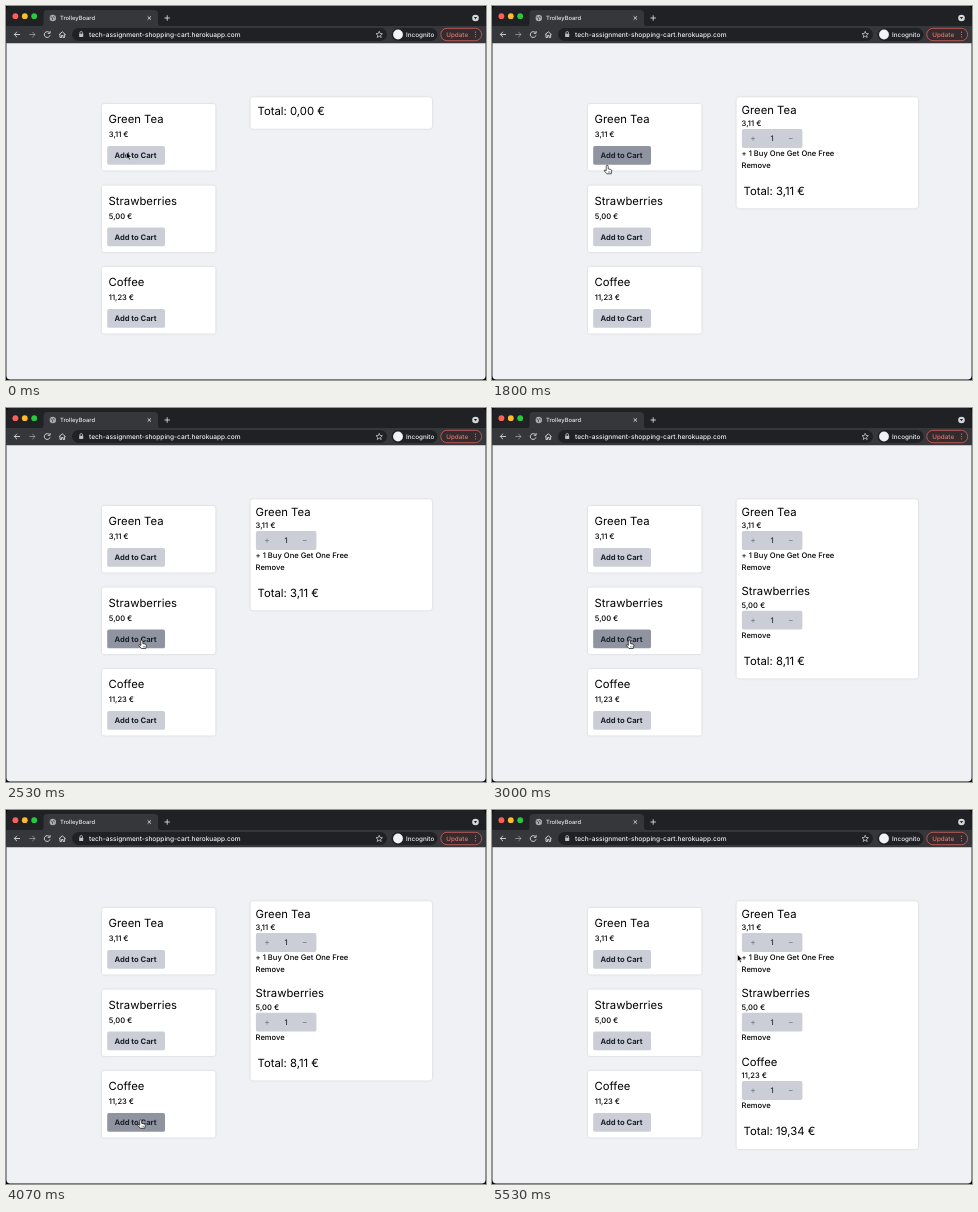
Animation, 480 px wide and 374 px high, one loop 8 s. Source, as an HTML page:

```html
<!DOCTYPE html>
<html lang="en">
<head>
<meta charset="utf-8">
<title>Cart demo</title>
<style>
  html, body { margin: 0; width: 100%; height: 100%; overflow: hidden; background: #0b0b0d; }
  svg { display: block; width: 480px; height: 374px; }
  text { font-family: Inter, "Liberation Sans", sans-serif; font-weight: 500; text-rendering: geometricPrecision; white-space: pre; }
  .title { font-size: 11.3px; font-weight: 400; fill: #000; }
  .body { font-size: 7.6px; fill: #000; }
  .label { font-size: 7.6px; font-weight: 700; fill: #1a202c; }
  .sign { font-size: 8.4px; font-weight: 400; fill: #6b7280; text-anchor: middle; }
  .count { font-size: 7.6px; fill: #1f2937; text-anchor: middle; }
  .card { fill: #fff; filter: drop-shadow(0 .9px .9px rgba(0, 0, 0, .14)); }
  .line { fill: none; stroke: #d9dbdf; stroke-width: .9; }
  .thin { stroke-width: .7; }
</style>
</head>
<body>
<svg viewBox="0 0 480 374">
  <!-- window -->
  <path d="M0 20V5Q0 0 5 0H475Q480 0 480 5V20Z" fill="#202124"/>
  <rect y="20" width="480" height="18" fill="#36373b"/>
  <path d="M.4 37.2H479.6V369.6Q479.6 373.6 475.6 373.6H4.4Q.4 373.6 .4 369.6Z" fill="#f0f1f5"/>
  <circle cx="9.4" cy="10.2" r="2.9" fill="#ff5f57"/>
  <circle cx="18.8" cy="10.2" r="2.9" fill="#febc2e"/>
  <circle cx="28.2" cy="10.2" r="2.9" fill="#28c840"/>

  <!-- tab -->
  <path d="M34 20.5Q37.5 20.5 37.5 17V8Q37.5 4 41.5 4H148Q152 4 152 8V17Q152 20.5 155.5 20.5Z" fill="#36373b"/>
  <circle cx="46.8" cy="12" r="3.2" fill="#a9acb1"/>
  <path d="M44.4 10.8l2 .9.3 2.4M48.6 9.6l-1.3 1.3 1.4 1" fill="none" stroke="#45474b" stroke-width=".8"/>
  <text x="54" y="14.1" font-size="5.8" fill="#e8eaed">TrolleyBoard</text>
  <path class="line" d="M141.6 10.3l3.4 3.4m0-3.4l-3.4 3.4M158.5 12h5.4m-2.7-2.7v5.4"/>
  <circle cx="469.5" cy="12" r="3.3" fill="#d5d7da"/>
  <path d="M467.9 11.1h3.2l-1.6 2.2Z" fill="#202124"/>

  <!-- toolbar -->
  <rect x="66" y="22" width="315" height="13" rx="6.5" fill="#202124"/>
  <g class="line">
    <path d="M14 28.5H8.3m2.7-2.7l-2.7 2.7 2.7 2.7"/>
    <path d="M23.3 28.5H29m-2.7-2.7l2.7 2.7-2.7 2.7" opacity=".55"/>
    <path d="M43.5 26.8A2.9 2.9 0 1 0 44 29.3M44.1 25.1v2.2h-2.3"/>
    <path d="M53 28.7l3.3-2.9 3.3 2.9M54 28.2v3.3h1.5v-2h1.6v2h1.5v-3.3"/>
    <path class="thin" d="M73.9 28v-1.2a1.3 1.3 0 0 1 2.6 0V28"/>
    <path class="thin" d="M373.2 25.3l.9 2.2 2.3.2-1.8 1.5.6 2.3-2-1.3-2 1.3.6-2.3-1.8-1.5 2.3-.2Z"/>
  </g>
  <rect x="73.2" y="27.8" width="4" height="3.2" rx=".5" fill="#bdc1c6"/>
  <text x="83" y="30.9" font-size="6.55" fill="#f1f2f4">tech-assignment-shopping-cart.herokuapp.com</text>
  <rect x="385.5" y="22" width="46" height="13" rx="6.5" fill="#202124"/>
  <circle cx="392" cy="28.5" r="4.9" fill="#f1f3f4"/>
  <text x="400.1" y="30.8" font-size="6.3" fill="#f1f3f4">Incognito</text>
  <rect x="434.8" y="22.3" width="40.8" height="12.4" rx="6.2" fill="#342b2e" stroke="#d9635f" stroke-width=".8"/>
  <text x="440.3" y="30.8" font-size="6.3" fill="#f0706a">Update</text>
  <g fill="#f0706a">
    <circle cx="469.5" cy="26.2" r=".6"/><circle cx="469.5" cy="28.5" r=".6"/><circle cx="469.5" cy="30.8" r=".6"/>
  </g>

  <g id="shop"></g>
  <g id="cart"></g>
  <g id="arrow">
    <path d="M0 0V7l1.6-1.5 1 2.4 1.2-.5-1-2.3H5Z" fill="#000" stroke="#fff" stroke-width=".5"/>
  </g>
  <g id="hand">
    <path d="M-1 1a1 1 0 0 1 2 0V3.6l2.6.6q1 .3 1 1.3l-.6 3H-.3L-2.9 5.6q-.3-1 .7-1L-1 5.5Z"
      fill="#fff" stroke="#000" stroke-width=".65" stroke-linejoin="round"/>
    <path d="M1.5 6v1.5M2.8 6v1.5" stroke="#000" stroke-width=".4"/>
  </g>
</svg>
<script>
const $ = id => document.getElementById(id);
const TICK = 1000 / 15, LOOP = 120;

const products = [
  { name: "Green Tea", price: "3,11 €", offer: "+ 1 Buy One Get One Free" },
  { name: "Strawberries", price: "5,00 €" },
  { name: "Coffee", price: "11,23 €" }
];
const totals = ["0,00 €", "3,11 €", "8,11 €", "19,34 €"];

// Times below are in ticks of 1/15 s.
const addAt = [26, 39, 65];
const hover = [[9, 27], [32, 54], [57, 75]];
const FADE = 2.25;
const REST = [203, 206, 214], DARK = [143, 148, 160];

// tick, x, y of the pointer tip
const path = [
  [0, 120.5, 146], [8, 120.5, 146], [10, 118.5, 147.5], [13, 114.8, 148.6], [16, 113.4, 148.6],
  [26, 113.4, 148.6], [28, 117, 170], [30, 123, 203], [32, 128.3, 221], [35, 133, 229],
  [38, 135.8, 232], [45, 137.3, 232], [51, 137.3, 232], [54, 135, 255], [57, 132.5, 302],
  [61, 134.7, 309.8], [74, 134.7, 309.8], [75, 140.5, 301], [77, 167, 259],
  [79, 205, 203], [81, 234, 161], [83, 245.5, 144.5]
];
const handSpans = [[9, 28], [32, 54], [57, 76]];

const text = (cls, x, y, s) => `<text class="${cls}" x="${x}" y="${y}">${s}</text>`;
const box = (x, y, w, h, r, attrs) =>
  `<rect x="${x}" y="${y}" width="${w}" height="${h}" rx="${r}" ${attrs}/>`;
const rgb = c => `rgb(${c.map(Math.round)})`;

function shopCard(p, i) {
  const y = 98 + i * 81.5;
  return box(96, y, 113.4, 66.4, 2, 'class="card"') +
    text("title", 102.6, y + 19.1, p.name) +
    text("body", 102.8, y + 33.4, p.price) +
    box(101.2, y + 41.9, 57.8, 18.9, 1.9, 'class="button"') +
    text("label", 108.5, y + 54.2, "Add to Cart");
}

// Height taken by the first n cart items.
const stack = n => n ? 79.6 + (n - 1) * 68.3 : 0;

function cartItem(p, i) {
  const x = 249.6, y = 107.7 + stack(i);
  return text("title", x, y, p.name) +
    text("body", x, y + 12.3, p.price) +
    box(x + .3, y + 15.4, 60.5, 18.9, 1.9, `fill="${rgb(REST)}"`) +
    text("sign", 261, y + 27.6, "+") +
    text("count", 280, y + 27.5, "1") +
    text("sign", 298.7, y + 27.6, "−") +
    (p.offer ? text("body", x, y + 42.7, p.offer) : "") +
    text("body", x, y + (p.offer ? 54 : 42.5), "Remove");
}

function cartView(n) {
  return box(244.6, 91.2, 181.4, 31.5 + stack(n), 3, 'class="card"') +
    products.slice(0, n).map(cartItem).join("") +
    text("title", 251.5, 109.1 + stack(n), "Total: " + totals[n]);
}

$("shop").innerHTML = products.map(shopCard).join("");
$("cart").innerHTML = totals.map((_, n) => `<g>${cartView(n)}</g>`).join("");
const buttons = [...document.querySelectorAll(".button")];
const views = [...$("cart").children];

const clamp = v => Math.max(0, Math.min(1, v));
const show = (el, on) => el.setAttribute("visibility", on ? "visible" : "hidden");

function tipAt(k) {
  const i = path.findIndex(p => p[0] > k);
  if (i < 0) return path[path.length - 1].slice(1);
  const [t0, x0, y0] = path[i - 1], [t1, x1, y1] = path[i];
  const f = (k - t0) / (t1 - t0);
  return [x0 + (x1 - x0) * f, y0 + (y1 - y0) * f];
}

function draw(ms) {
  const k = Math.floor((ms + 8) / TICK) % LOOP;
  const count = addAt.filter(t => k >= t).length;
  views.forEach((v, n) => show(v, n === count));
  buttons.forEach((b, i) => {
    const [on, off] = hover[i];
    const shade = clamp((k - on) / FADE) - clamp((k - off) / FADE);
    b.setAttribute("fill", rgb(REST.map((c, j) => c + (DARK[j] - c) * shade)));
  });
  const isHand = handSpans.some(([a, b]) => k >= a && k < b);
  const move = `translate(${tipAt(k)})`;
  for (const [id, on] of [["hand", isHand], ["arrow", !isHand]]) {
    $(id).setAttribute("transform", move);
    show($(id), on);
  }
}

const start = performance.now();
function frame() {
  draw((performance.now() - start) % 8000);
  requestAnimationFrame(frame);
}
frame();
</script>
</body>
</html>
```
